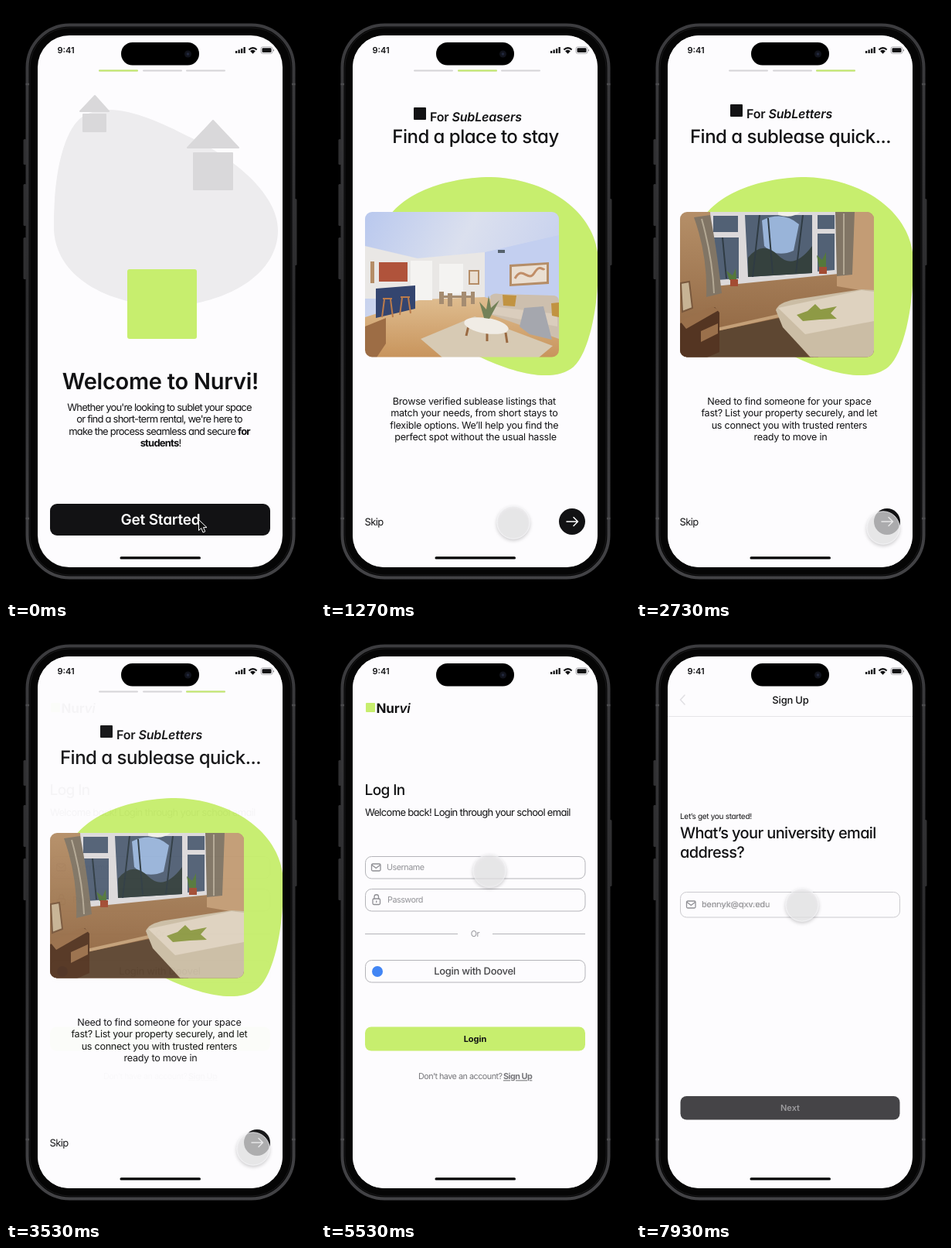
These frames come from a looping animation (400x766 px, 8 s). An HTML page:

```html
<!DOCTYPE html>
<html lang="en">
<head>
<meta charset="utf-8">
<title>Onboarding</title>
<style>
  html, body { margin: 0; width: 100%; height: 100%; overflow: hidden; background: #000; }
  svg { display: block; width: 100%; height: 100%; }
  text { font-family: Inter, "Open Sans", sans-serif; fill: #121214; text-rendering: geometricPrecision; }
  .geo { font-feature-settings: "cv11"; }
  .mid { text-anchor: middle; }
  .h1 { font-size: 29px; font-weight: 600; letter-spacing: -.25px; }
  .h2 { font-size: 24px; font-weight: 500; letter-spacing: -.5px; }
  .h3 { font-size: 20px; font-weight: 500; letter-spacing: -.63px; }
  .role { font-size: 16px; font-weight: 600; letter-spacing: -.15px; }
  .intro { font-size: 13px; letter-spacing: -.79px; }
  .body { font-size: 12.6px; letter-spacing: -.27px; }
  .hint { font-size: 10.8px; letter-spacing: -.5px; fill: #929297; }
  .soft { fill: #d9d8da; }
  .lime { fill: #c7ee6e; }
  .white { fill: #fdfcfe; }
  .ink { fill: #121214; }
  .field { fill: none; stroke: #b4b4b9; }
  .glyph { fill: none; stroke: #8f8f94; stroke-width: 1.3; stroke-linecap: round; stroke-linejoin: round; }
  .bar { stroke: #d5d4d7; stroke-width: 2; stroke-linecap: round; }
  .on { stroke: #c2e968; }

  .t { animation: 8s linear infinite both; }
  #pick { animation-name: pick; }
  #find { animation-name: find; }
  #findBar { animation-name: findBar; }
  #findBlob { animation-name: findBlob; }
  #list { animation-name: list; }
  #login { animation-name: login; }
  #signup { animation-name: signup; }
  #typed { animation-name: typed; }
  #empty { animation-name: empty; }
  #touch { animation-name: touch; }
  #dot { animation-name: dot; }

  @keyframes pick { 0%, .9% { opacity: 1 } 3.6%, 100% { opacity: 0 } }
  @keyframes find { 0%, 5.2% { opacity: 0 } 8.6%, 100% { opacity: 1 } }
  @keyframes findBar { 0%, 6% { opacity: 0 } 10.6%, 100% { opacity: 1 } }
  @keyframes findBlob { 0%, 9.2% { opacity: 0 } 15.6%, 100% { opacity: 1 } }
  @keyframes list { 0%, 26.8% { opacity: 0 } 31%, 100% { opacity: 1 } }
  @keyframes login { 0%, 44% { opacity: 0 } 48.2%, 100% { opacity: 1 } }
  @keyframes signup { 0%, 79.3% { opacity: 0 } 84%, 100% { opacity: 1 } }
  @keyframes typed { 0%, 97.4% { opacity: 0 } 100% { opacity: 1 } }
  @keyframes empty { 0%, 97.4% { opacity: 1 } 100% { opacity: 0 } }
  @keyframes dot { 0%, 5.2% { opacity: 0 } 8.2%, 100% { opacity: 1 } }
  @keyframes touch {
    0%, 16.4% { transform: translate(249px, 667px); animation-timing-function: ease-in-out }
    23.4%, 27% { transform: translate(321px, 672px) }
    30%, 55.2% { transform: translate(320px, 674px); animation-timing-function: ease-in-out }
    58.4%, 68.8% { transform: translate(218px, 314px); animation-timing-function: ease-in-out }
    78.6%, 91.4% { transform: translate(255px, 590px); animation-timing-function: ease-in-out }
    98.4%, 100% { transform: translate(215px, 359px) }
  }
</style>
</head>
<body>
<svg viewBox="0 0 400 766">
  <defs>
    <clipPath id="screen"><rect x="41" y="38" width="317" height="687" rx="41"/></clipPath>
    <clipPath id="photo"><rect x="57" y="266" width="251" height="187.500" rx="9"/></clipPath>
    <linearGradient id="rim" x2="0" y2="1">
      <stop offset="0" stop-color="#3c3c3f"/><stop offset=".5" stop-color="#2b2b2d"/><stop offset="1" stop-color="#434346"/>
    </linearGradient>
    <linearGradient id="wall" x2="1" y2=".4">
      <stop offset="0" stop-color="#b9c8ee"/><stop offset=".5" stop-color="#dbe0ee"/><stop offset="1" stop-color="#c6d0ee"/>
    </linearGradient>
    <linearGradient id="wood" x2="0" y2="1">
      <stop offset="0" stop-color="#dfbd90"/><stop offset="1" stop-color="#c8945c"/>
    </linearGradient>
    <linearGradient id="dusk" x2="0" y2="1">
      <stop offset="0" stop-color="#b58f68"/><stop offset="1" stop-color="#8d633f"/>
    </linearGradient>
    <rect id="page" class="white" x="40" y="37" width="319" height="689"/>
    <path id="bars" class="bar" d="M121 83.500H170M178 83.500H227M234 83.500H283"/>
    <path id="blob" d="M80 290C90 248 155 221 220 221C290 223 350 262 358 318C362 375 349 446 327 466C301 488 249 474 205 453C140 424 70 360 80 290Z"/>
    <g id="mail" class="glyph"><rect x="65.500" y="0" width="11.500" height="9" rx="1.500"/><path d="M66 1.500L71.250 5.500L76.500 1.500"/></g>
    <g id="nav">
      <text class="geo" x="56.500" y="671" font-size="13" letter-spacing="-.6">Skip</text>
      <circle class="ink" cx="325" cy="666" r="17"/>
      <path d="M318 666H332.500M327 660.500L332.500 666L327 671.500" fill="none" stroke="#fff" stroke-width="1.500" stroke-linecap="round" stroke-linejoin="round"/>
    </g>
  </defs>

  <!-- phone shell -->
  <g fill="#2f2f31">
    <rect x="22.500" y="172" width="4" height="33" rx="1.500"/>
    <rect x="22.500" y="230" width="4" height="54" rx="1.500"/>
    <rect x="22.500" y="299" width="4" height="54" rx="1.500"/>
    <rect x="373" y="249" width="3.500" height="86" rx="1.500"/>
  </g>
  <rect x="27.500" y="24.500" width="345" height="714" rx="55" fill="#050505" stroke="url(#rim)" stroke-width="4"/>
  <rect x="31" y="28" width="338" height="707" rx="51" fill="none" stroke="#19191a"/>
  <path d="M25.500 101H30M370 101H374.500M25.500 662H30M370 662H374.500" stroke="#4b4b4e" stroke-width="2.500"/>

  <g clip-path="url(#screen)">
    <!-- welcome -->
    <g>
      <use href="#page"/>
      <use href="#bars"/>
      <path class="bar on" d="M121 83.500H170"/>
      <path fill="#edecee" d="M62 290C61 225 72 168 95 146C130 118 190 145 235 168C300 198 352 245 352 290C352 345 290 383 215 388C140 388 66 355 62 290Z"/>
      <g class="soft" stroke="#d9d8da" stroke-width="2" stroke-linejoin="round">
        <path d="M115 116L133 136H96ZM100 140H129V162H100Z"/>
        <path d="M268 148L301 183H235ZM243 190H293V237H243Z"/>
      </g>
      <rect class="lime" x="157" y="340" width="90" height="90" rx="3"/>
      <text class="geo mid h1" x="200" y="495">Welcome to Nurvi!</text>
      <text class="geo mid intro" y="523">
        <tspan x="200">Whether you're looking to sublet your space</tspan>
        <tspan x="200" dy="15.300">or find a short-term rental, we're here to</tspan>
        <tspan x="200" dy="15.300">make the process seamless and secure <tspan font-weight="700">for</tspan></tspan>
        <tspan x="200" dy="15.300"><tspan font-weight="700">students</tspan>!</tspan>
      </text>
      <rect class="ink" x="57" y="643" width="285" height="41" rx="9"/>
      <text class="geo mid" x="200" y="670" font-size="19" font-weight="600" letter-spacing="-.2" style="fill:#fff">Get Started</text>
      <path id="pick" class="t" d="M249.500 663.500V677.500L252.800 674.500L255 680L257.800 678.800L255.500 673.600H260Z" fill="#111" stroke="#fff" stroke-linejoin="round"/>
    </g>

    <!-- find a place -->
    <g id="find" class="t">
      <use href="#page"/>
      <use href="#bars"/>
      <path id="findBar" class="t bar on" d="M178 83.500H227"/>
      <rect class="ink" x="120" y="131" width="16" height="16" rx="1"/>
      <text class="role" x="141" y="148.500">For <tspan font-style="italic">SubLeasers</tspan></text>
      <text class="geo mid h2" x="200" y="177">Find a place to stay</text>
      <use href="#blob" fill="#ecebed"/>
      <use id="findBlob" class="t lime" href="#blob"/>
      <g clip-path="url(#photo)">
        <path fill="url(#wall)" d="M57 266H308V454H57Z"/>
        <path fill="#e9e7e5" d="M57 310L125 326L212 318V378H57Z"/>
        <path fill="#c3cff0" d="M212 318L308 296V400L212 378Z"/>
        <path fill="url(#wood)" d="M57 402L130 379L212 376L308 404V454H57Z"/>
        <path fill="#f4f3f1" d="M116 329H144V380H116ZM153 333H184V372H153Z"/>
        <path fill="#b0533b" d="M75 331H112V356H75Z"/>
        <path fill="#34456f" d="M71 365L122 361V391L71 403Z"/>
        <path fill="none" stroke="#ba7b4b" stroke-width="2" d="M80 378H92M82 379L79 402M90 379L93 402M103 376H115M105 377L102 399M113 377L116 397"/>
        <path fill="#b58d67" d="M64 330H69V358H64ZM191 341H205V360H191ZM244 334L295 331V359L244 362Z"/>
        <path fill="#eadfd2" d="M193 343H203V358H193ZM247 337L292 334V356L247 359Z"/>
        <path fill="none" stroke="#c18e68" stroke-width="3" d="M251 352C261 334 268 358 276 345S287 343 289 339"/>
        <path fill="#56626d" d="M229 315H238V319H229Z"/>
        <path fill="#a58c71" d="M153 369H159V385H153ZM164 371H170V388H164ZM182 369H188V388H182ZM194 369H199V385H194ZM158 374H194V377H158Z"/>
        <path fill="#d7cab4" d="M129 430L199 401L300 439L282 454H157Z"/>
        <path fill="#cdbfae" d="M219 375Q222 370 232 372L302 374Q308 375 308 382V430L221 399Z"/>
        <path fill="#dacdbd" d="M222 388L306 398V414L222 398Z"/>
        <path fill="#c19342" d="M235 373L253 374L251 388L236 387ZM298 384L308 383V402L299 400Z"/>
        <path fill="#a5a7ae" d="M263 390L288 388L299 431L270 424L257 414Z"/>
        <path fill="none" stroke="#9a6a42" stroke-width="3" d="M191 413L188 426M239 422L241 435M215 423V433"/>
        <ellipse cx="214" cy="413" rx="29" ry="10" fill="#f0ece5" transform="rotate(9 214 413)"/>
        <path fill="#738158" d="M211 403L205 382L214 392L217 374L220 390L231 380L218 404Z"/>
        <path fill="#9d6d45" d="M57 414L84 403V436L72 454H57Z"/>
      </g>
      <text class="mid body" y="515">
        <tspan x="200">Browse verified sublease listings that</tspan>
        <tspan x="200" dy="15.400">match your needs, from short stays to</tspan>
        <tspan x="200" dy="15.400">flexible options. We’ll help you find the</tspan>
        <tspan x="200" dy="15.400">perfect spot without the usual hassle</tspan>
      </text>
      <use href="#nav"/>
    </g>

    <!-- list a place -->
    <g id="list" class="t">
      <use href="#page"/>
      <use href="#bars"/>
      <path class="bar on" d="M234 83.500H283"/>
      <rect class="ink" x="122" y="127" width="16" height="16" rx="1"/>
      <text class="role" x="143" y="145">For <tspan font-style="italic">SubLetters</tspan></text>
      <text class="geo mid h2" x="200" y="177">Find a sublease quick...</text>
      <use href="#blob" class="lime"/>
      <g clip-path="url(#photo)">
        <path fill="url(#dusk)" d="M57 266H308V454H57Z"/>
        <path fill="#c39c75" d="M260 266H308V370L260 362Z"/>
        <path fill="#5e4732" d="M57 430L190 402L230 454H57Z"/>
        <path fill="none" stroke="#c4a078" stroke-width="4" d="M100 419L185 400"/>
        <path fill="#dcd9da" d="M96 266H262V346L102 362Z"/>
        <path fill="#526175" d="M100 271H132V292H100ZM101 299H133V352L104 354ZM141 270H228V345L145 350ZM235 270H257V288H235ZM235 294H257V341L235 343Z"/>
        <path fill="#99b4d9" d="M163 277Q190 264 211 282L204 316Q181 326 166 310Z"/>
        <path fill="#35413e" d="M145 325Q164 302 184 322T228 310V345L145 350Z"/>
        <path fill="none" stroke="#2f3b43" stroke-width="2" d="M151 350L160 270M177 346L171 274M207 345L216 270M117 352L112 299"/>
        <path fill="#f1f0e9" d="M184 266H213Q202 275 184 270Z"/>
        <path fill="#817565" d="M75 273L96 270Q104 310 111 371L91 376Q93 323 75 273ZM258 266H283L280 347L260 349Z"/>
        <path fill="none" stroke="#b3a894" stroke-width="2" d="M85 275Q99 325 101 371M269 268V347"/>
        <path fill="#55783b" d="M121 354L117 342L125 348L129 339L130 353ZM237 337L234 322L241 328L246 318V338Z"/>
        <path fill="#a34c33" d="M122 353H132V362H122ZM237 337H247V346H237Z"/>
        <path fill="#765137" d="M181 394L224 454H236V420Z"/>
        <path fill="#cbbda5" d="M181 393Q184 383 206 379L292 366L308 367V454H226L190 415Z"/>
        <path fill="#ded2bf" d="M184 390L292 367L308 369V407L219 424Z"/>
        <path fill="#8e9a45" d="M208 399L222 394L232 385L239 392L260 388L252 397L260 404L238 405L216 407Z"/>
        <path fill="#543522" d="M57 410L102 389L108 396V447L92 454H57Z"/>
        <path fill="#9a704b" d="M57 407L99 388L107 393L65 417ZM84 420L106 410V423L84 434Z"/>
        <path fill="#c7b394" stroke="#79583d" stroke-width="2" d="M58 358L69 356L73 390L60 395Z"/>
      </g>
      <text class="mid body" y="515">
        <tspan x="200">Need to find someone for your space</tspan>
        <tspan x="200" dy="15.400">fast? List your property securely, and let</tspan>
        <tspan x="200" dy="15.400">us connect you with trusted renters</tspan>
        <tspan x="200" dy="15.400">ready to move in</tspan>
      </text>
      <use href="#nav"/>
    </g>

    <!-- log in -->
    <g id="login" class="t">
      <use href="#page"/>
      <rect class="lime" x="58" y="98" width="12" height="12" rx="1"/>
      <text class="geo" x="71.500" y="110.500" font-size="17" font-weight="700" letter-spacing="-.2">Nur<tspan font-style="italic" font-weight="600">vi</tspan></text>
      <text class="geo" x="56.500" y="216.500" font-size="19" font-weight="500" letter-spacing="-.6">Log In</text>
      <text class="geo" x="57" y="244" font-size="13" letter-spacing="-.68">Welcome back! Login through your school email</text>
      <rect class="field" x="57.500" y="296.500" width="284.500" height="28.500" rx="8"/>
      <rect class="field" x="57.500" y="338.500" width="284.500" height="28.500" rx="8"/>
      <rect class="field" x="57.500" y="430.500" width="284.500" height="28.500" rx="8"/>
      <use href="#mail" y="306"/>
      <g class="glyph"><rect x="67" y="351" width="9.500" height="7.500" rx="1.500"/><path d="M69 351V348.500A2.700 2.700 0 0 1 74.500 348.500V351M71.750 354V355.500"/></g>
      <text class="hint" x="85" y="314.300">Username</text>
      <text class="hint" x="86" y="356.300">Password</text>
      <path d="M57 396.500H177M222 396.500H342" stroke="#b4b4b9"/>
      <text class="hint mid" x="199.500" y="400">Or</text>
      <circle cx="73" cy="445" r="7" fill="#4285f4"/>
      <text class="mid" x="199" y="449.300" font-size="13" font-weight="500" letter-spacing="-.3" style="fill:#454548">Login with Doovel</text>
      <rect class="lime" x="57" y="516.500" width="285" height="31" rx="8"/>
      <text class="mid" x="199.500" y="535.500" font-size="11" font-weight="700">Login</text>
      <text class="hint" x="126" y="584.300" style="fill:#77777b">Don’t have an account?</text>
      <text class="hint" x="236" y="584.300" font-weight="700" text-decoration="underline" style="fill:#77777b">Sign Up</text>
    </g>

    <!-- sign up -->
    <g id="signup" class="t">
      <use href="#page"/>
      <path d="M63 88L57.500 94L63 100" fill="none" stroke="#e0dfe3" stroke-width="1.500" stroke-linecap="round"/>
      <text class="geo mid" x="200" y="98.500" font-size="13" font-weight="500" letter-spacing="-.2">Sign Up</text>
      <path d="M41 115.500H358" stroke="#e5e4e8"/>
      <text class="geo" x="57" y="248" font-size="10" letter-spacing="-.3">Let’s get you started!</text>
      <text class="geo h3" x="57" y="273">What’s your university email</text>
      <text class="geo h3" x="57" y="297.500">address?</text>
      <rect class="field" x="57.500" y="342.500" width="284" height="32.500" rx="8" style="stroke:#cbcace"/>
      <use href="#mail" y="354"/>
      <text id="empty" class="t hint" x="85" y="362.300">Your school email</text>
      <text id="typed" class="t" x="85" y="362.300" font-size="10.800" style="fill:#58585b">bennyk@qxv.edu</text>
      <rect x="57.500" y="606" width="284" height="30.500" rx="8" fill="#454447"/>
      <text class="mid" x="199.500" y="625" font-size="11" font-weight="600" style="fill:#9c9b9e">Next</text>
    </g>

    <g id="touch" class="t">
      <g id="dot" class="t">
        <circle r="21.200" fill="#eeeef0" fill-opacity=".7" stroke="#f8f8fa" stroke-opacity=".8" style="filter:drop-shadow(0 2px 2px rgba(0,0,0,.25))"/>
      </g>
    </g>
  </g>

  <!-- status bar -->
  <text x="66.500" y="61" font-size="11" font-weight="600">9:41</text>
  <rect x="149" y="47" width="101" height="29.500" rx="14.750"/>
  <circle cx="235.500" cy="62" r="4.500" fill="#11131c"/>
  <circle cx="235.500" cy="62" r="1.800" fill="#22283c"/>
  <g class="ink">
    <path d="M297 58H299.300V61H297ZM300.500 56.500H302.800V61H300.500ZM304 55H306.300V61H304ZM307.500 53H309.800V61H307.500Z"/>
    <path d="M313.700 55.700Q319.500 50.500 325.300 55.700L323.900 57.200Q319.500 53.200 315.100 57.200ZM316.100 58.200Q319.500 55.300 322.900 58.200L319.500 61.700Z"/>
    <rect x="331.500" y="54.300" width="12" height="5.700" rx="1.300"/>
    <path d="M346.300 55.700Q347.700 57.200 346.300 58.700Z"/>
  </g>
  <rect x="330" y="52.800" width="15" height="8.700" rx="2.500" fill="none" stroke="#9b9b9f" stroke-width=".8"/>
  <rect x="147.500" y="711.300" width="104.500" height="3.200" rx="1.600"/>
</svg>
</body>
</html>
```
